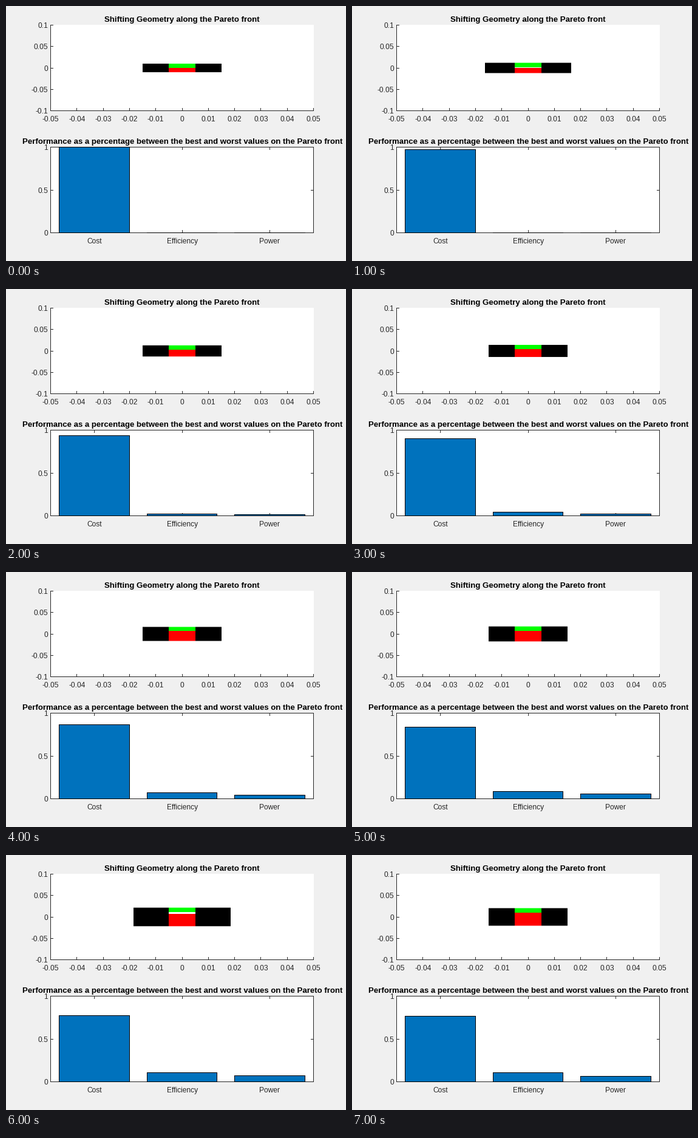
Write a matplotlib script that moves like this. It is 560x420 px and loops after 8 s.

```python
import matplotlib.pyplot as plt
from matplotlib.animation import FuncAnimation
from matplotlib.patches import Rectangle

W, H = 560, 420
LEFT, RIGHT = 73, 506
GEO_TOP, GEO_BASE = 31, 172
BAR_TOP, BAR_BASE = 232, 373
MID_X, MID_Y = 290, 102
SCALE_X, SCALE_Y = 4330, 705
INK = "#262626"
TICK = 4

# half width, half height, air gap, cost, efficiency, power
STEPS = [
    (0.0150, 0.0100, 0.0000, 1.000, 0.000, 0.000),
    (0.0163, 0.0120, 0.0013, 0.972, 0.000, 0.000),
    (0.0150, 0.0130, 0.0000, 0.936, 0.021, 0.014),
    (0.0150, 0.0141, 0.0000, 0.900, 0.045, 0.021),
    (0.0150, 0.0164, 0.0000, 0.865, 0.073, 0.043),
    (0.0150, 0.0175, 0.0000, 0.837, 0.085, 0.057),
    (0.0185, 0.0217, 0.0043, 0.773, 0.107, 0.071),
    (0.0150, 0.0205, 0.0000, 0.766, 0.107, 0.064),
]
BAR_SPANS = [(87, 204), (232, 348), (376, 493)]

fig = plt.figure(figsize=(W / 100, H / 100), dpi=100, facecolor="#f0f0f0")
ax = fig.add_axes([0, 0, 1, 1])
ax.set_xlim(0, W)
ax.set_ylim(H, 0)
ax.axis("off")


def box(x0, y0, x1, y1, color, z=1):
    patch = Rectangle((x0, y0), x1 - x0, y1 - y0, fc=color, lw=0,
                      zorder=z, snap=False)
    return ax.add_patch(patch)


def place(patch, x0, y0, x1, y1):
    patch.set_bounds(x0, y0, x1 - x0, y1 - y0)


def hline(x0, x1, y):
    box(x0, y, x1 + 1, y + 1, INK, 2)


def vline(x, y0, y1):
    box(x, y0, x + 1, y1 + 1, INK, 2)


def label(x, y, text, ha="center", size=12, color=INK, weight="normal"):
    ax.text(x, y, text, ha=ha, va="baseline", fontsize=size * 0.72,
            color=color, weight=weight, family="Liberation Sans", zorder=6)


def title(y, text):
    label(290.2, y, text, size=13.2, color="black", weight="bold")


def draw_geometry_axes():
    box(LEFT, GEO_TOP, RIGHT + 1, GEO_BASE + 1, "white")
    hline(LEFT, RIGHT, GEO_BASE)
    vline(LEFT, GEO_TOP, GEO_BASE)
    for i in range(11):
        x = LEFT + i * (RIGHT - LEFT) / 10
        vline(round(x), GEO_BASE - TICK, GEO_BASE)
        label(x + 0.5, 190, f"{(i - 5) / 100:g}")
    for i in range(5):
        y = GEO_TOP + i * (GEO_BASE - GEO_TOP) / 4
        hline(LEFT, LEFT + TICK, round(y))
        label(69, round(y) + 5, f"{(2 - i) / 20:g}", "right")
    title(26, "Shifting Geometry along the Pareto front")


def draw_bar_axes():
    box(LEFT, BAR_TOP, RIGHT + 1, BAR_BASE + 1, "white")
    for y in (BAR_TOP, BAR_BASE):
        hline(LEFT, RIGHT, y)
    for x in (LEFT, RIGHT):
        vline(x, BAR_TOP, BAR_BASE)
    for x, name in ((145, "Cost"), (290, "Efficiency"), (434, "Power")):
        vline(x, BAR_TOP, BAR_TOP + TICK)
        vline(x, BAR_BASE - TICK, BAR_BASE)
        label(x + 0.5, 391, name)
    for y, name in ((BAR_TOP, "1"), (303, "0.5"), (BAR_BASE, "0")):
        hline(LEFT, LEFT + TICK, y)
        hline(RIGHT - TICK, RIGHT, y)
        label(69, y + 5, name, "right")
    title(227, "Performance as a percentage between the best and "
               "worst values on the Pareto front")


draw_geometry_axes()
draw_bar_axes()
sides = [box(0, 0, 0, 0, "black", 3) for _ in range(2)]
red = box(0, 0, 0, 0, "#ff0000", 3)
green = box(0, 0, 0, 0, "#00ff00", 3)
outlines = [box(0, 0, 0, 0, "black", 4) for _ in BAR_SPANS]
fills = [box(0, 0, 0, 0, "#0072bd", 5) for _ in BAR_SPANS]


def update(step):
    half_w, half_h, gap, *values = STEPS[step]
    top, bottom = MID_Y - half_h * SCALE_Y, MID_Y + half_h * SCALE_Y
    outer = round(half_w * SCALE_X)
    inner = round(0.005 * SCALE_X)
    place(sides[0], MID_X - outer, top, MID_X - inner, bottom)
    place(sides[1], MID_X + inner, top, MID_X + outer, bottom)
    green_end = round(top + 0.01 * SCALE_Y)
    red_start = round(top + (0.01 + gap) * SCALE_Y)
    place(green, MID_X - inner, top, MID_X + inner, green_end)
    place(red, MID_X - inner, red_start, MID_X + inner, bottom)

    for (x0, x1), value, outline, fill in zip(BAR_SPANS, values, outlines, fills):
        y = round(BAR_BASE - value * (BAR_BASE - BAR_TOP))
        place(outline, x0, y, x1, BAR_BASE + 1)
        place(fill, x0 + 1, y + 1, x1 - 1, max(BAR_BASE, y + 1))
        fill.set_visible(y + 1 < BAR_BASE)
    return [*sides, red, green, *outlines, *fills]


anim = FuncAnimation(fig, update, frames=len(STEPS), interval=1000,
                     repeat=True, repeat_delay=0, blit=False)
plt.show()
```
